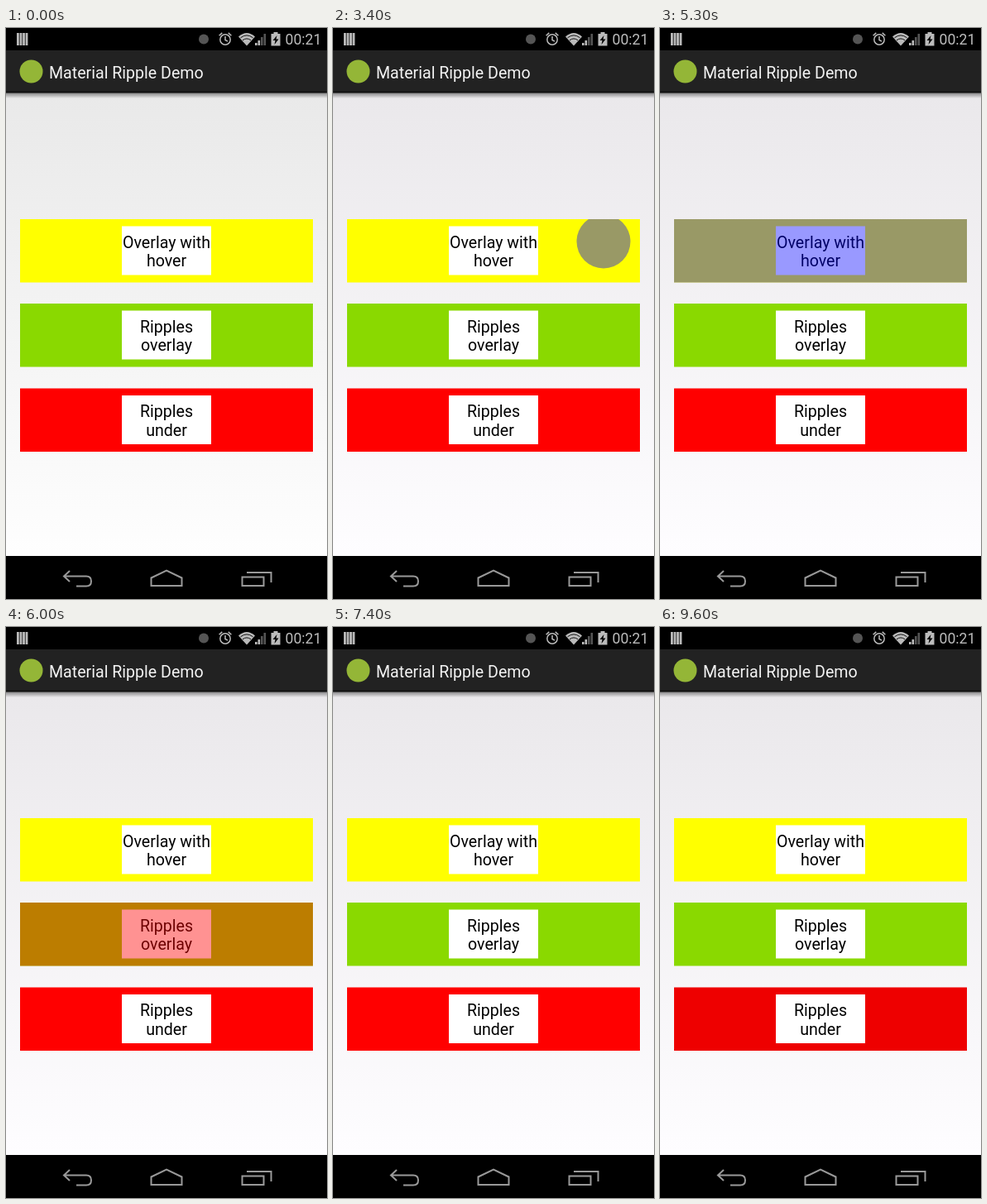
Write an HTML page that moves like this. It is 388x690 px and loops after 9.7 s.

```html
<!DOCTYPE html>
<html lang="en">
<head>
<meta charset="utf-8">
<title>Material Ripple Demo</title>
<style>
  html, body { margin: 0; width: 100%; height: 100%; overflow: hidden; background: #000; }
  svg { display: block; width: 388px; height: 690px; font: 19.6px Roboto, sans-serif; }
</style>
</head>
<body>
<svg viewBox="0 0 388 690">
  <defs>
    <linearGradient id="page" x2="0" y2="1">
      <stop id="top"/>
      <stop id="bottom" offset="1"/>
    </linearGradient>
    <linearGradient id="shadow" x2="0" y2="1">
      <stop stop-opacity=".45"/>
      <stop offset="1" stop-opacity="0"/>
    </linearGradient>
  </defs>

  <rect y="78" width="388" height="560" fill="url(#page)"/>
  <rect y="78" width="388" height="7" fill="url(#shadow)"/>
  <rect y="27" width="388" height="51" fill="#222"/>
  <rect y="76.5" width="388" height="2" fill="#111"/>
  <circle cx="30.5" cy="52.5" r="14" fill="#94b637"/>
  <text x="52" y="60.5" fill="#f3f3f3">Material Ripple Demo</text>

  <g id="status" fill="#bbb">
    <path d="M13 6h2.8v15H13zM16.6 6h2.8v15h-2.8zM20.1 6h2.8v15h-2.8zM23.6 6h2.8v15h-2.8z"/>
    <circle cx="239" cy="13.5" r="6" fill="#555"/>
    <g fill="none" stroke="#bbb" stroke-width="1.5">
      <circle cx="265" cy="14" r="6.2"/>
      <path d="M265 10v4.5l3 1.7M257.6 9.3l3.7-3.4M272.4 9.3l-3.7-3.4"/>
    </g>
    <path d="M281 10.5Q291 1.500 301 10.500L291 21.500Z"/>
    <path d="M283.500 11.800Q291 6 298.500 11.800M286 14.800Q291 11 296 14.800" fill="none" stroke="#000" stroke-width=".9"/>
    <path d="M301 21V18h2.600v3zM304.500 21v-6h2.600v6z"/>
    <path d="M308 21V11h2.600v10zM311.500 21V7h2.600v14z" fill="#555"/>
    <path d="M323.500 7V5h5v2h3v14.500h-11V7z"/>
    <path d="M327.500 9l-5 6h3l-1 5 5-6.500h-3z" fill="#000"/>
    <text x="337.500" y="20" font-size="17.600">00:21</text>
  </g>

  <g id="rows"></g>

  <rect y="638" width="388" height="52"/>
  <g fill="none" stroke="#999" stroke-width="2">
    <path d="M77 656l-7 6.500 7 6.500M70 662.500h27q6 0 6 6t-6 6h-12"/>
    <path d="M175.500 674v-9.500L194 655.500l18.500 9V674z"/>
    <path d="M285.500 663.500h26v10.500h-26zM291 658h29.500v12"/>
  </g>
</svg>
<script>
const LOOP = 9700, GROW = 400, FADE_AT = 420, FADE = 100;
const HOVER_START = 1550, HOVER_END = 4900, HOVER_RADIUS = 32.5;

// Finger path while pressing the first row: time, x, y
const path = [
  [1550, 215, 270], [2300, 282, 264], [2850, 318, 262],
  [3400, 327, 258], [4100, 270, 265], [4900, 205, 269]
];

// Taps: start time, x, y
const rows = [
  { y: 231, fill: '#ff0', words: ['Overlay with', 'hover'], color: '#00f', alpha: .4,
    taps: [[HOVER_END, 205, 269]] },
  { y: 333, fill: '#8ad900', words: ['Ripples', 'overlay'], color: '#f00', alpha: .43,
    taps: [[5580, 285, 372], [6200, 90, 375], [6800, 300, 370], [7440, 110, 372]] },
  { y: 435.500, fill: '#f00', words: ['Ripples', 'under'], color: '#000', alpha: .2, under: true,
    taps: [[7965, 290, 474], [8480, 90, 475], [9115, 285, 473]] }
];

const byId = id => document.getElementById(id);

byId('rows').innerHTML = rows.map((row, i) => {
  const { y, fill, words, color, under } = row;
  const ripple = `<g clip-path="url(#clip${i})"><circle id="ripple${i}" fill="${color}"/></g>`;
  const label = `<rect x="140" y="${y + 8.500}" width="108" height="59" fill="#fff"/>
    <text text-anchor="middle"><tspan x="194" y="${y + 34.500}">${words[0]}</tspan><tspan
      x="194" y="${y + 57.300}">${words[1]}</tspan></text>`;
  return `<clipPath id="clip${i}"><rect x="17" y="${y}" width="354" height="76.500"/></clipPath>
    <rect x="17" y="${y}" width="354" height="76.500" fill="${fill}"/>
    ${under ? ripple + label : label + ripple}`;
}).join('');

function fingerAt(t) {
  const i = path.findIndex(p => p[0] > t);
  const [t0, x0, y0] = path[i - 1], [t1, x1, y1] = path[i];
  const u = (t - t0) / (t1 - t0), s = u * u * (3 - 2 * u);
  return [x0 + (x1 - x0) * s, y0 + (y1 - y0) * s];
}

function rippleState(row, index, t) {
  if (index === 0 && t >= HOVER_START && t < HOVER_END)
    return [...fingerAt(t), HOVER_RADIUS, row.alpha];
  const tap = row.taps.find(([start]) => t >= start && t < start + FADE_AT + FADE);
  if (!tap) return [0, 0, 0, 0];
  const [start, x, y] = tap, age = t - start;
  const grown = 1 - (1 - Math.min(1, age / GROW)) ** 2;
  const from = index === 0 ? HOVER_RADIUS : 8;
  const fade = Math.min(1, 1 - (age - FADE_AT) / FADE);
  return [x, y, from + (435 - from) * grown, row.alpha * fade];
}

function draw(now) {
  const t = now % LOOP;
  const tinted = t >= 1600;
  byId('top').setAttribute('stop-color', tinted ? '#eae8eb' : '#e9e9e9');
  byId('bottom').setAttribute('stop-color', tinted ? '#fefdff' : '#fefefe');
  rows.forEach((row, i) => {
    const [x, y, r, alpha] = rippleState(row, i, t);
    const attrs = { cx: x, cy: y, r, 'fill-opacity': alpha };
    for (const name in attrs) byId('ripple' + i).setAttribute(name, attrs[name]);
  });
  requestAnimationFrame(() => draw(performance.now()));
}
draw(0);
</script>
</body>
</html>
```
